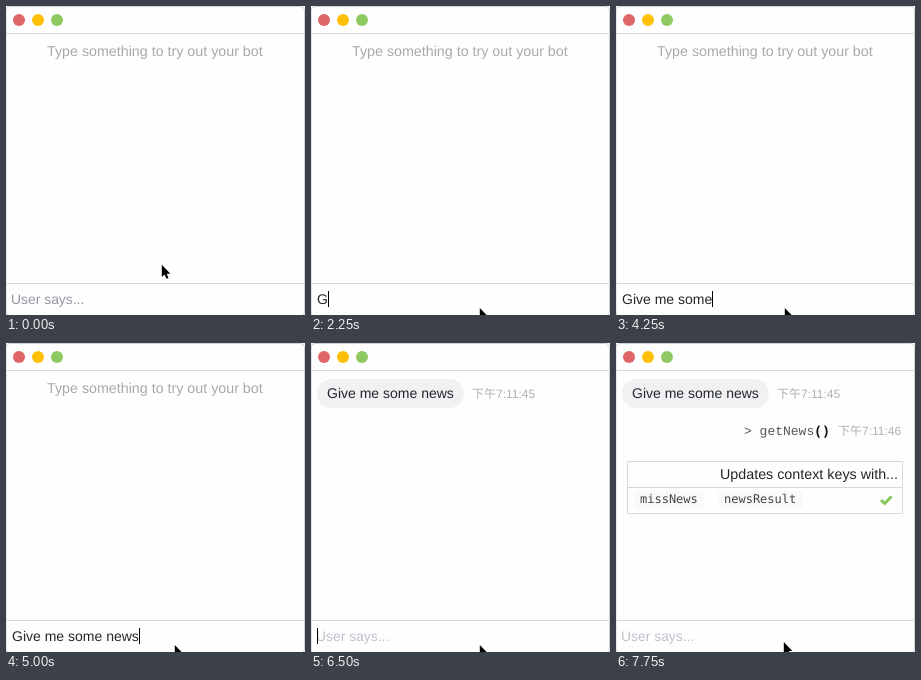
An HTML page for the animation above (8000 ms loop, 299x309 px).

```html
<!DOCTYPE html>
<html lang="en">
<head>
<meta charset="utf-8">
<title>Bot chat</title>
<style>
  html, body { margin: 0; width: 100%; height: 100%; overflow: hidden; background: #fff; }
  svg { display: block; }
  text { font: 14px "Liberation Sans", Arial, sans-serif; fill: #24272b; white-space: pre; text-rendering: geometricPrecision; }
  .hint { font-size: 14.27px; fill: #a9a9a9; }
  .time { font: 12px "Liberation Sans", "Noto Sans CJK SC", "Noto Sans CJK JP", sans-serif; fill: #b0b0b0; }
  .call { font: 13px "Liberation Mono", monospace; fill: #555; }
  .call tspan { font-weight: bold; fill: #111; }
  .key { font: 12px "DejaVu Sans Mono", monospace; fill: #444; }
  .line { fill: none; stroke: #d8d8d8; }
  .chip { fill: #f9f9f9; }
</style>
</head>
<body>
<svg width="299" height="309" viewBox="0 0 299 309">
  <rect x="0" y=".5" width="298.5" height="309.5" rx="4" fill="#fefefe" stroke="#d0d0d0"/>
  <circle cx="13" cy="14" r="6" fill="#e06566"/>
  <circle cx="32" cy="14" r="6" fill="#fdc006"/>
  <circle cx="51" cy="14" r="6" fill="#8fc962"/>
  <path class="line" d="M0 27.5H299M0 277.5H299"/>

  <text id="hint" class="hint" x="41" y="50">Type something to try out your bot</text>

  <g id="message">
    <rect x="6" y="36" width="147" height="29" rx="14.5" fill="#f0f1f3"/>
    <text x="16" y="55">Give me some news</text>
    <text class="time" x="161" y="55">下午7:11:45</text>
  </g>

  <g id="reply">
    <text class="call" x="128" y="92">&gt; getNews<tspan>()</tspan></text>
    <text class="time" x="222" y="92">下午7:11:46</text>
    <path class="line" d="M11.5 118.5H286.5V170.5H11.5ZM11.5 144.5H286.5"/>
    <text x="282" y="136" text-anchor="end" style="font-size:14.3px">Updates context keys with...</text>
    <rect class="chip" x="18" y="148" width="70" height="17" rx="3"/>
    <rect class="chip" x="102" y="148" width="85" height="17" rx="3"/>
    <text class="key" x="24" y="160">missNews</text>
    <text class="key" x="108" y="160">newsResult</text>
    <path d="M265 157L268.7 160.5L275.5 153.5" fill="none" stroke="#84c85c" stroke-width="3"/>
  </g>

  <text id="placeholder" x="5" y="298" style="font-size:13.9px">User says...</text>
  <text id="input" x="6" y="298"></text>
  <rect id="caret" y="285" width="1" height="16" fill="#000"/>
  <path id="pointer" d="M0 0V12.2L2.8 9.7L4.7 14L6.7 13.1L4.9 8.9H8.6Z"
        stroke="#fff" stroke-width="1.4" paint-order="stroke"/>
</svg>
<script>
const LOOP = 8000, FOCUS = 1250, SEND = 5500, REPLY = 6750;
const PHRASE = "Give me some news";
// [start ms, characters typed]
const typing = [[0, 0], [2250, 1], [2750, 3], [3000, 5], [3250, 6], [3500, 8],
  [4000, 10], [4250, 12], [4500, 13], [4750, 15], [5000, 17], [SEND, 0]];
// [start ms, tip x, tip y]
const moves = [[0, 155.8, 258.8], [250, 156, 292], [500, 156, 291], [750, 166.5, 295],
  [1000, 166.8, 293.8], [FOCUS, 168, 300], [1500, 168.8, 302], [7750, 167.8, 299]];

const el = id => document.getElementById(id);
const show = (id, on) => el(id).setAttribute("visibility", on ? "visible" : "hidden");
const current = (steps, t) => steps.findLast(s => s[0] <= t);

function draw(t) {
  const typed = PHRASE.slice(0, current(typing, t)[1]);
  const focused = t >= FOCUS;
  const blinkOff = t >= SEND && Math.floor((t - SEND) / 500) % 2 === 1;

  show("hint", t < SEND);
  show("message", t >= SEND);
  show("reply", t >= REPLY);
  show("placeholder", !typed);
  el("placeholder").style.fill = focused ? "#bfc2cb" : "#92969f";

  const input = el("input");
  if (input.textContent !== typed) input.textContent = typed;
  const width = typed ? input.getComputedTextLength() : 0;
  el("caret").setAttribute("x", Math.round(6 + width));
  show("caret", focused && t < REPLY && !blinkOff);

  const [, x, y] = current(moves, t);
  el("pointer").setAttribute("transform", `translate(${x} ${y})`);
}

const start = performance.now();
function tick() {
  draw((performance.now() - start) % LOOP);
  requestAnimationFrame(tick);
}
tick();
</script>
</body>
</html>
```
